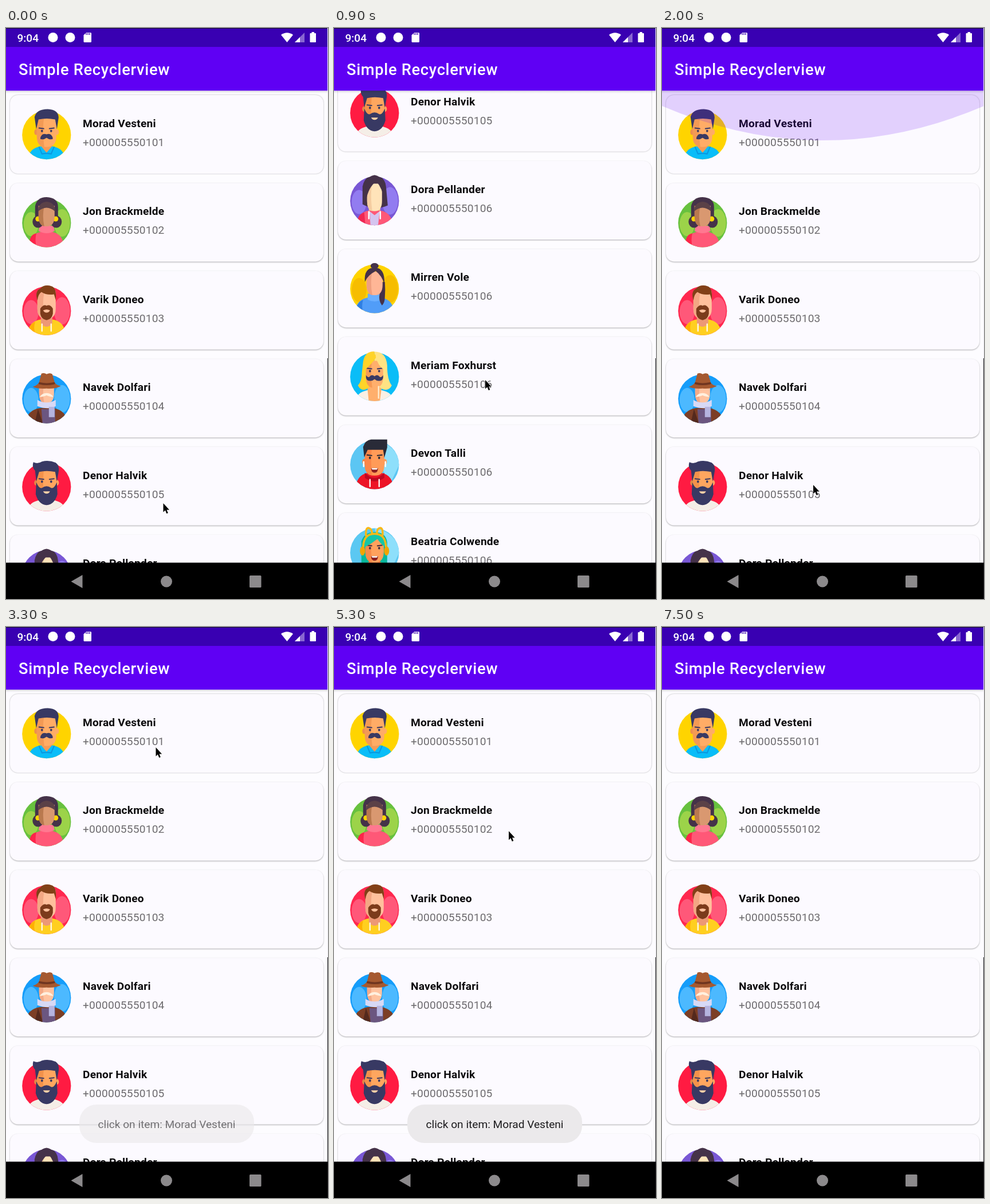
An HTML page for the animation above (7.6 s loop, 562 by 996 pixels).

```html
<!DOCTYPE html>
<html lang="en">
<head>
<meta charset="utf-8">
<title>Contact list</title>
<style>
html, body { margin: 0; width: 100%; height: 100%; overflow: hidden; background: #000; }
svg { display: block; width: 100vw; height: 100vh; font-family: Roboto, "Open Sans", sans-serif; }
.name { font-weight: 700; font-size: 19.13px; letter-spacing: .22px; fill: #0b0a0c; }
.phone { font-size: 19.13px; letter-spacing: .22px; fill: #6d6b6e; }
.card { fill: #fcfaff; }
</style>
</head>
<body>
<svg viewBox="0 0 562 996" xmlns="http://www.w3.org/2000/svg">
  <defs>
    <clipPath id="viewport"><rect y="109" width="562" height="824"/></clipPath>
    <clipPath id="disc"><circle r="42.6"/></clipPath>
    <linearGradient id="barShadow" x2="0" y2="1">
      <stop stop-color="#000" stop-opacity=".13"/><stop offset="1" stop-color="#000" stop-opacity="0"/>
    </linearGradient>
  </defs>
  <rect width="562" height="996" fill="#fdfcff"/>
  <g clip-path="url(#viewport)">
    <g id="list"></g>
    <path id="glow" fill="#5f00f3" opacity=".17"/>
  </g>
  <rect y="109" width="561" height="5" fill="url(#barShadow)"/>
  <rect width="561" height="34" fill="#3900b2"/>
  <rect y="33" width="561" height="76.3" fill="#5f00f4"/>
  <text x="22" y="81.5" font-size="27.3" font-weight="500" letter-spacing=".68" fill="#fff">Simple Recyclerview</text>
  <g fill="#fff">
    <text x="19.5" y="23.5" font-size="19" font-weight="500">9:04</text>
    <circle cx="82" cy="16.5" r="8.5"/>
    <circle cx="112" cy="16.5" r="8.5"/>
    <path d="M140 8H147.5Q149 8 149 9.5V23.5Q149 25 147.5 25H137Q135.500 25 135.5 23.5V12.5Z"/>
    <path d="M480 12Q490.5 4.5 501 12L490.5 25Z"/>
    <path d="M521 8V25H504Z" opacity=".4"/>
    <path d="M513 16V25H504Z"/>
    <path d="M533.5 7H538V9H540Q541 9 541 10V24Q541 25 540 25H531.5Q530.5 25 530.5 24V10Q530.5 9 531.5 9H533.5Z"/>
  </g>
  <path d="M140 8.5V12M143 8.5V12M146 8.5V12" stroke="#3900b2" stroke-width="1.4"/>
  <g id="toast">
    <rect x="128" y="833" width="305" height="67" rx="30" fill="#ebe9eb"/>
    <text x="280.5" y="874" text-anchor="middle" font-size="19.13" fill="#1c1b1d">click on item: Morad Vesteni</text>
  </g>
  <rect y="932.6" width="562" height="64" fill="#000"/>
  <g fill="#8c8a8c">
    <path d="M113.5 965.5L133.5 954V977Z"/>
    <circle cx="280" cy="965.5" r="10"/>
    <rect x="425" y="955" width="20.5" height="21" rx="1.5"/>
  </g>
  <rect width="562" height="1" fill="#18122a"/>
  <rect x="561" width="1" height="576" fill="#efedf2"/>
  <rect x="561" y="576" width="1" height="420" fill="#17161a"/>
  <path id="cursor" d="M0 0V15.5L3.4 12.3L5.8 18L8.3 16.9L6 11.4H10.6Z" fill="#000" stroke="#fff" stroke-width="1.2" paint-order="stroke" stroke-linejoin="round"/>
</svg>
<script>
const LOOP = 7600, STEP = 100, PITCH = 153.4, TOP = 117;
const $ = id => document.getElementById(id);

// Shape helpers, in avatar units around the disc centre.
const path = (fill, d) => `<path fill="${fill}" d="${d}"/>`;
const line = (stroke, width, d) =>
  `<path fill="none" stroke="${stroke}" stroke-width="${width}" stroke-linecap="round" d="${d}"/>`;
const oval = (fill, x, y, rx, ry = rx) => `<ellipse fill="${fill}" cx="${x}" cy="${y}" rx="${rx}" ry="${ry}"/>`;
const inDisc = (...parts) => `<g clip-path="url(#disc)">${parts.join('')}</g>`;
const disc = color => oval(color, 0, 0, 42.6);
const backdrop = color => oval(color, -27, 2, 13, 21) + oval(color, 27, 0, 14, 24);
const sky = path('#8edffb', 'M0 -43Q40 -35 43 0L24 40Z');
const shoulders = (color, half = 32, top = 20) =>
  path(color, `M${-half} 44Q${-half} ${top + 4} -11 ${top}H11Q${half} ${top + 4} ${half} 44Z`);
const neck = color => path(color, 'M-10 8H10V22Q0 33 -10 22Z');
const ears = (light, dark, y = -5) => oval(dark, -18, y, 3.5, 5) + oval(light, 18, y, 3.5, 5);
const face = (light, dark, half = 17, top = -32, chin = 18) => {
  const jaw = chin - 10;
  return path(light, `M${-half} ${top}H${half}V${jaw - 8}Q${half} ${chin} 0 ${chin}Q${-half} ${chin} ${-half} ${jaw - 8}Z`) +
    path(dark, `M${-half} ${top}H-4Q-8 -12 -4 ${chin}Q${-half} ${chin - 2} ${-half} ${jaw - 8}Z`);
};
const eyes = (color, y = -7) =>
  oval(color, -8, y, 1.8, 2.2) + oval(color, 8, y, 1.8, 2.2) +
  line(color, 2, `M-13 ${y - 5}L-5 ${y - 4}M5 ${y - 4}L13 ${y - 5}`);
const smile = path('#8d2020', 'M-6 6H6Q6 14 0 14Q-6 14 -6 6Z') + path('#fff', 'M-5.5 6H5.5L4 8.5H-4Z');
const cords = (color, y, x = 8) => line(color, 2.5, `M${-x} ${y}V${y + 12}M${x} ${y}V${y + 12}`);
const headset = line('#f8b819', 3.5, 'M-20 -5Q-21 -33 0 -33Q21 -33 20 -5') +
  oval('#f3a500', -21, -3, 4.5, 8) + oval('#f3a500', 21, -3, 4.5, 8);

const NAVY = '#383963', PLUM = '#453249';
const avatars = [
  disc('#ffd400') + inDisc(neck('#ed8f4d'), shoulders('#09bdf8'), path('#f49b58', 'M-11 18H11L0 31Z'),
    line('#0a97df', 2, 'M-13 21L-8 33L0 32L8 33L13 21')) +
    ears('#ffac66', '#ed8f4d') + face('#ffac66', '#f39a55', 17, -32, 21) + eyes(NAVY) +
    path(NAVY, 'M0 -1Q5 -3 8 0Q11 3 11 7Q5 9 0 5Q-5 9 -11 7Q-11 3 -8 0Q-5 -3 0 -1Z') +
    path(NAVY, 'M-18 -10L-21 -31Q-18 -45 2 -45Q21 -44 21 -30L18 -10L15 -27Q0 -30 -14 -27Z'),

  disc('#67c13e') + inDisc(backdrop('#9cd349'), neck('#b27750'), shoulders('#ff5877', 30, 16),
    path('#ff2449', 'M-30 44Q-32 21 -18 18Q-21 33 -17 44Z'), path('#ff7890', 'M-12 5H12L14 14Q0 22 -14 14Z')) +
    oval(PLUM, -15, -2, 9.5, 10.5) + oval(PLUM, 17, -2, 9.5, 10.5) +
    path(PLUM, 'M-20 -8V-29Q-17 -45 0 -45Q20 -44 20 -28V-8Z') +
    oval('#ffd400', -15, -7, 4.5) + oval('#ffd400', 16, -7, 4.5) + face('#d99870', '#b9794f', 14, -30, 6) +
    path('#5b4147', 'M-15 -20Q-14 -36 0 -37Q15 -36 15 -20Q0 -33 -15 -20Z'),

  disc('#ff284f') + inDisc(backdrop('#ff5879'), shoulders('#ffcf20', 33, 15),
    path('#ffb000', 'M-33 44Q-32 23 -20 19Q-24 33 -18 44Z'), neck('#ed9876'), cords('#fff5df', 23)) +
    face('#ffc09c', '#f3a784', 16, -34, 14) +
    path('#824017', 'M-16 -18Q-21 -35 -11 -39Q-4 -47 9 -43Q18 -40 16 -19L13 -29Q0 -27 -9 -33Q-15 -29 -16 -18Z') +
    path('#7c3b1b', 'M-11 -4Q-5 -12 0 -9Q6 -12 11 -4V5Q9 15 0 16Q-9 15 -11 5Z') +
    path('#ffc09c', 'M-6 -1Q0 -4 6 -1Q4 3 0 3Q-4 3 -6 -1Z'),

  disc('#159dfa') + inDisc(backdrop('#4cb9ff'), shoulders('#7c3e25', 36, 16),
    path('#54291d', 'M-15 18L-6 44H-21Z'), path('#6b5680', 'M-9 18H15V44H-7Z')) +
    face('#ffc3a0', '#f3aa88', 13, -25, 8) + path('#fff0df', 'M0 -10Q8 -10 12 -3Q4 -4 0 -6Q-4 -4 -12 -3Q-8 -10 0 -10Z') +
    path('#d7d9f5', 'M-16 2Q0 11 16 2V13Q4 20 -16 13Z') + path('#b5b4df', 'M4 14H14V32H4Z') +
    path('#a55930', 'M-24 -21Q-15 -24 -13 -29L-9 -44Q-4 -46 0 -43Q6 -46 10 -43L14 -29Q16 -24 25 -22Q15 -17 0 -18Q-16 -17 -24 -21Z') +
    line('#703620', 3.5, 'M-12 -27Q0 -24 13 -27'),

  disc('#ff1b42') + inDisc(neck('#e78945'), shoulders('#f5eee7', 33, 23)) +
    ears('#ffa65f', '#e78945', -7) + face('#ffa65f', '#f3924b', 17, -33, 18) + eyes(NAVY, -9) +
    path(NAVY, 'M-18 -8Q-13 4 -8 2Q0 -4 8 2Q13 4 18 -8L19 13Q14 31 0 32Q-14 31 -19 13Z') +
    path('#ffd2a8', 'M-6 8H6Q4 12 0 12Q-4 12 -6 8Z') +
    path(NAVY, 'M-18 -9L-20 -28Q-26 -34 -23 -43Q-16 -39 -8 -44Q4 -47 16 -42Q23 -37 21 -26L18 -9L15 -26Q0 -29 -13 -26Z'),

  disc('#7957d5') + inDisc(backdrop('#927cf0'), path(PLUM, 'M-21 6V-25Q-17 -45 1 -45Q18 -43 20 -25L23 8Q0 18 -21 6Z'),
    neck('#f2c796'), shoulders('#ff5877', 31, 17), path('#f02753', 'M-31 44Q-31 24 -18 20L-16 44Z'),
    path('#d5c4ef', 'M-9 18L0 25L9 18L6 44H-7Z'), cords('#fff', 19, 10)) +
    face('#ffe3b9', '#f5cda1', 13, -30, 18) +
    path(PLUM, 'M-15 0Q-21 -43 0 -45Q20 -43 17 0Q14 -22 3 -34Q-11 -24 -15 0Z'),

  disc('#ffd300') + inDisc(backdrop('#f6bd00'), neck('#ea9575'), shoulders('#519df8', 34, 15),
    path('#2f7fe2', 'M-34 44Q-32 24 -20 19Q-24 34 -18 44Z'), path('#6aafff', 'M-12 8Q0 14 12 8V19Q0 25 -12 19Z')) +
    oval(PLUM, 0, -40, 7, 5) + path(PLUM, 'M9 -12H18Q19 2 18 14Q18 24 13 29Q6 20 9 8Z') +
    face('#ffb696', '#ef9f80', 14, -30, 11) +
    path(PLUM, 'M-17 -12Q-19 -37 0 -37Q19 -37 17 -8Q13 -23 2 -31Q-12 -24 -17 -12Z'),

  disc('#0abdf7') + inDisc(neck('#ed8f4d'), shoulders('#faf0e5', 33, 23), path('#ffaf6c', 'M-13 14H13L9 44H-10Z')) +
    path('#ffd329', 'M-20 -26Q-17 -45 0 -44V10L-12 20Q-23 27 -29 15Q-22 8 -22 -8Z') +
    path('#ffe383', 'M0 -44Q20 -44 22 -20Q22 5 30 15Q24 27 11 20L0 10Z') +
    face('#ffaf6c', '#f69a54', 15, -28, 19) + eyes(NAVY, -10) +
    path(NAVY, 'M0 -1Q5 -5 9 0Q12 2 15 -3Q16 8 7 7Q3 7 0 4Q-3 7 -7 7Q-16 8 -15 -3Q-12 2 -9 0Q-5 -5 0 -1Z') +
    path('#ffd329', 'M4 -36Q-4 -23 -17 -12Q-20 -37 0 -40Z') + path('#ffe383', 'M2 -40Q18 -36 17 -12Q5 -20 2 -36Z') +
    line('#ffe9c8', 2.5, 'M7 17V37'),

  disc('#5cc6f3') + inDisc(sky, neck('#ed783e'), shoulders('#ed1426', 33, 14),
    path('#bf0820', 'M-17 14Q0 32 17 14V23Q0 35 -17 23Z'), cords('#fff0ee', 26)) +
    ears('#ff9b58', '#f7813f') + face('#ff9b58', '#fa8749', 17, -32, 19) +
    eyes('#292b38', -12) + smile + path('#292b38', 'M-18 -13L-20 -31Q-16 -43 -6 -44H22V-30L17 -12L15 -26H-12Z') +
    line('#fff', 2.5, 'M-19 -5V3M19 -5V3'),

  disc('#5bc8f2') + inDisc(sky, path('#08b89c', 'M-23 20V-20Q-18 -36 0 -36Q20 -36 22 -18V20Z'),
    neck('#f57a3f'), shoulders('#f4f8fb', 29, 21), path('#ff8d4e', 'M-12 17H12Q8 31 0 32Q-8 31 -12 17Z')) +
    face('#ffa15d', '#f88c4c', 16, -24, 17) + eyes('#443044', -8) + smile +
    path('#16c5a7', 'M-18 -9Q-21 -36 0 -36Q20 -35 19 -9Q10 -16 5 -24Q-5 -16 -18 -9Z') + headset +
    line('#f8b819', 3.5, 'M-15 -30Q-16 -44 -10 -43Q-5 -42 -4 -33M14 -30Q15 -44 9 -43Q4 -42 4 -33'),

  disc('#55c7f4') + inDisc(sky, neck('#f0a481'), shoulders('#f3f6fb', 31, 21)) +
    oval('#df2c60', -23, -35, 10) + oval('#ff527d', 24, -35, 10) + face('#ffc4a1', '#f7ac8c', 17, -28, 18) +
    eyes('#67304a', -9) + smile + path('#f33b70', 'M-20 -8V-26Q-15 -43 0 -43Q20 -42 20 -24V-8L14 -22Q0 -17 -13 -23Z') +
    headset + line('#f8b819', 1.5, 'M19 5V38')
];

const names = ['Morad Vesteni', 'Jon Brackmelde', 'Varik Doneo', 'Navek Dolfari', 'Denor Halvik', 'Dora Pellander',
  'Mirren Vole', 'Meriam Foxhurst', 'Devon Talli', 'Beatria Colwende', 'Rina Dovhami'];

$('list').innerHTML = names.map((name, i) => `
  <g transform="translate(0 ${TOP + i * PITCH})">
    <rect class="card" x="7" width="547" height="137" rx="14"/>
    <g transform="translate(70.8 69.6)">${avatars[i]}</g>
    <text class="name" x="134" y="56">${name}</text>
    <text class="phone" x="134" y="89">+000005550${101 + Math.min(i, 5)}</text>
  </g>`).join('');
const cards = [...document.querySelectorAll('.card')];

// Linear interpolation between [time, value] keys.
function track(keys, t) {
  const next = keys.findIndex(key => key[0] > t);
  if (next < 0) return keys[keys.length - 1][1];
  if (next === 0) return keys[0][1];
  const [t0, a] = keys[next - 1], [t1, b] = keys[next];
  return a + (b - a) * (t - t0) / (t1 - t0);
}

const scroll = [[0, 0], [100, 20], [200, 130], [300, 290], [400, 400], [500, 460], [700, 520], [800, 570], [900, 652],
  [1000, 750], [1100, 830], [1200, 862], [1500, 862], [1600, 823.6], [1700, 712], [1800, 520], [1900, 200], [2000, 0]];
const glowDepth = [[1900, 0], [2000, 87], [2100, 80], [2600, 0]];
const toastAlpha = [[3100, 0], [3300, .6], [3500, 1], [5500, 1], [5800, 0]];
const cursorX = [[0, 274.5], [300, 266], [900, 264], [2000, 264], [2900, 261.5], [4300, 261.5], [5300, 305], [5700, 420], [6100, 575]];
const cursorY = [[0, 829], [100, 809], [200, 699], [300, 540], [400, 500], [600, 720], [700, 746], [800, 696], [900, 614],
  [1000, 516], [1100, 450], [1500, 450], [1600, 489], [1700, 600], [1800, 720], [2000, 797], [2300, 740], [2900, 210],
  [4300, 210], [5300, 356], [6100, 400]];

function draw(t) {
  const offset = track(scroll, t);
  $('list').setAttribute('transform', `translate(0 ${-offset})`);
  // Light falls from above the screen, so shadows lengthen towards the bottom.
  cards.forEach((card, i) => {
    const drop = .8 + (TOP + i * PITCH - offset) / 933;
    card.style.filter = `drop-shadow(0 ${drop}px 1.1px rgba(0,0,0,.32))`;
  });
  const depth = track(glowDepth, t), edge = 109 + depth * .31;
  $('glow').setAttribute('d', depth ? `M0 109V${edge}Q281 ${109 + depth * 1.69} 562 ${edge}V109Z` : '');
  $('glow').setAttribute('opacity', .17 * Math.min(1, depth / 60));
  $('toast').setAttribute('opacity', track(toastAlpha, t));
  $('cursor').setAttribute('transform', `translate(${track(cursorX, t)} ${track(cursorY, t)})`);
}

const start = performance.now();
function tick() {
  const t = (performance.now() - start) % LOOP;
  draw(Math.floor(t / STEP) * STEP);
  requestAnimationFrame(tick);
}
tick();
</script>
</body>
</html>
```
